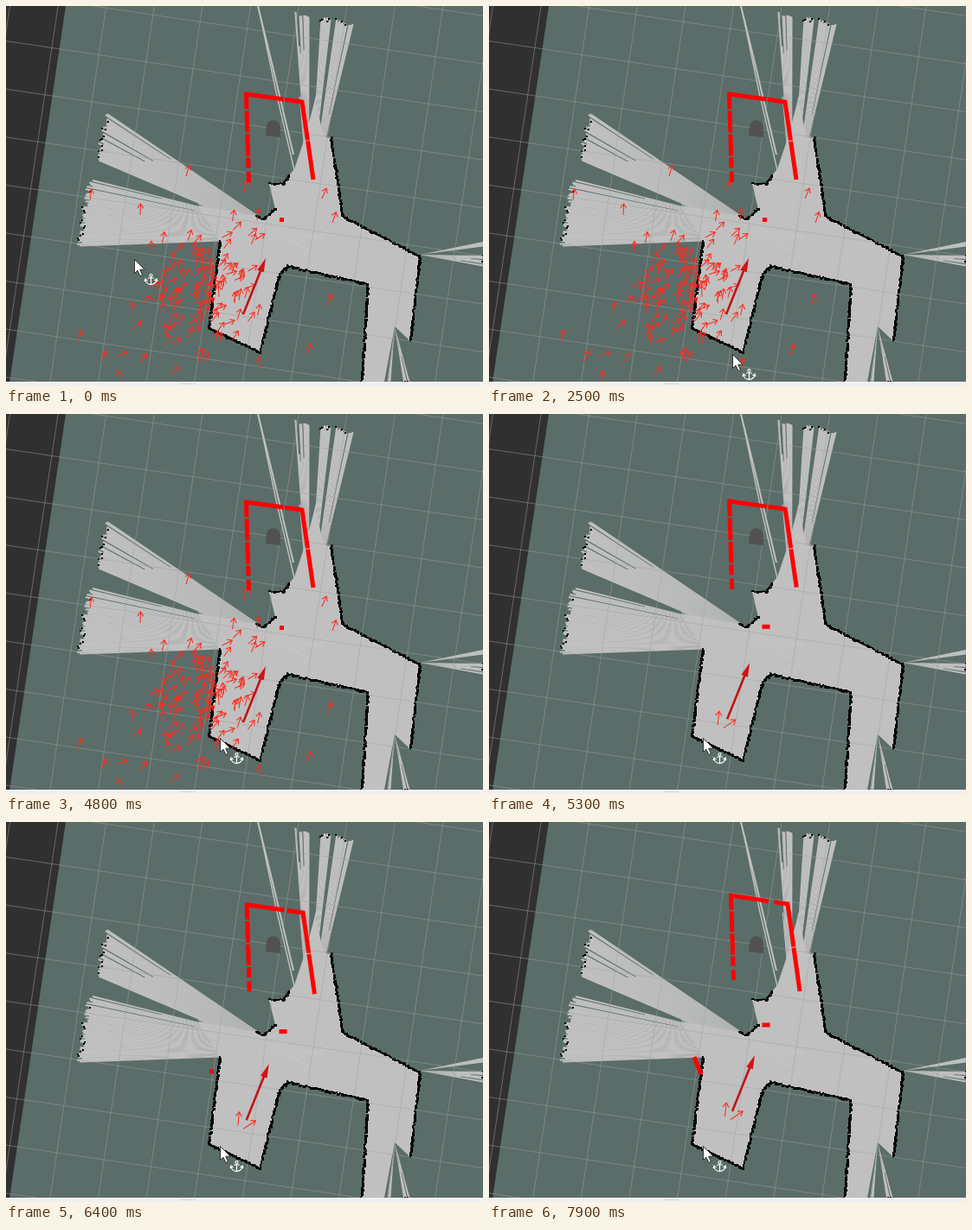
Recreate the animation shown at these times as an HTML page with a canvas. Size 551x440 px, loop 8 s.

```html
<!DOCTYPE html>
<html lang="en">
<head>
<meta charset="utf-8">
<title>Robot localization</title>
<style>
html, body { margin: 0; width: 100%; height: 100%; overflow: hidden; background: #5a6d69; }
canvas { display: block; }
</style>
</head>
<body>
<canvas id="stage" width="551" height="440"></canvas>
<script>
const W = 551, H = 440, LOOP = 8000;
const FLOOR = '#c0c0c0', UNKNOWN = '#5a6d69', RED = '#ff0000', THIN_RED = '#ff2a1e';
const ctx = document.getElementById('stage').getContext('2d');

function seeded(seed) {
  return () => {
    seed = (seed + 0x6D2B79F5) | 0;
    let v = Math.imul(seed ^ (seed >>> 15), 1 | seed);
    v = (v + Math.imul(v ^ (v >>> 7), 61 | v)) ^ v;
    return ((v ^ (v >>> 14)) >>> 0) / 4294967296;
  };
}

const mix = (a, b, k) => a + (b - a) * k;
const mixPoint = (p, q, k) => [mix(p[0], q[0], k), mix(p[1], q[1], k)];
const clamp01 = k => Math.max(0, Math.min(1, k));

function trace(g, points) {
  g.beginPath();
  points.forEach(([x, y]) => g.lineTo(x, y));
}

function fillShape(g, points, color) {
  trace(g, points);
  g.closePath();
  g.fillStyle = color;
  g.fill();
}

function strokeShape(g, points, color, width) {
  trace(g, points);
  g.strokeStyle = color;
  g.lineWidth = width;
  g.stroke();
}

// ---- static map ----

const ROOM = [
  [222, 231], [290, 243], [297, 247], [311, 235], [304, 206], [320, 206], [327, 196],
  [333, 189], [346, 150], [357, 108], [367, 152], [375, 153], [389, 244], [478, 290],
  [467, 388], [449, 371], [437, 435], [411, 435], [418, 322], [325, 301], [316, 310],
  [293, 401], [234, 373], [247, 272]
];
const WALL_SPANS = [[1, 3], [4, 6], [11, 14], [17, 23]];

// Sensor beams: many slim strips from an eye to an outer edge; some stop short.
function drawBeam(g, rnd, eye, a, b, gap) {
  const count = Math.ceil(Math.hypot(b[0] - a[0], b[1] - a[1]) / 1.8);
  for (let i = 0; i < count; i++) {
    const reach = rnd() < gap ? mix(0.5, 0.85, rnd()) : mix(0.985, 1.01, rnd());
    const near = mixPoint(eye, mixPoint(a, b, i / count), reach);
    const far = mixPoint(eye, mixPoint(a, b, (i + 1.3) / count), reach);
    fillShape(g, [eye, near, far], FLOOR);
    if (reach > 0.9 && rnd() < 0.3) {
      g.fillStyle = '#000';
      g.fillRect(Math.round(near[0]) - 1, Math.round(near[1]) - 1, 2, 2);
    }
  }
}

function drawWall(g, rnd, points) {
  g.fillStyle = '#000';
  for (let i = 1; i < points.length; i++) {
    const a = points[i - 1], b = points[i];
    const steps = Math.ceil(Math.hypot(b[0] - a[0], b[1] - a[1]) / 1.5);
    for (let n = 0; n <= steps; n++) {
      const [x, y] = mixPoint(a, b, n / steps);
      const size = rnd() < 0.5 ? 2 : 3;
      g.fillRect(Math.round(x + rnd() * 1.4 - 1.7), Math.round(y + rnd() * 1.4 - 1.7), size, size);
    }
  }
}

function drawGrid(g) {
  const dx = 54.4, dy = 8.1, x0 = 61, y0 = -6;
  for (let i = -3; i < 13; i++) {
    const x = x0 + dx * i, y = y0 + dy * i;
    const u = x0 - dy * i, v = y0 + dx * i;
    strokeShape(g, [[x + dy * 3, y - dx * 3], [x - dy * 10, y + dx * 10]], 'rgba(160,160,160,.5)', 1);
    strokeShape(g, [[u - dx * 2, v - dy * 2], [u + dx * 11, v + dy * 11]], 'rgba(160,160,160,.5)', 1);
  }
}

function buildMap() {
  const layer = document.createElement('canvas');
  layer.width = W;
  layer.height = H;
  const g = layer.getContext('2d'), rnd = seeded(11);
  const beam = (...args) => drawBeam(g, rnd, ...args);

  g.fillStyle = UNKNOWN;
  g.fillRect(0, 0, W, H);
  fillShape(g, [[0, 0], [69, 0], [4, 436], [0, 436]], '#303030');
  fillShape(g, ROOM, FLOOR);

  const west = [352, 284], southwest = [366, 268], north = [350, 234];
  const east = [478, 288], south = [449, 371];
  beam(west, [117, 124], [105, 180], 0.2);
  beam(southwest, [100, 201], [93, 216], 0.45);
  beam(southwest, [93, 216], [84, 278], 0.05);
  beam(north, [330, 5], [350, 12], 0.25);
  beam(north, [362, 13], [375, 16], 0.4);
  beam(north, [381, 17], [401, 21], 0.25);
  beam(east, [551, 273], [551, 278], 0);
  beam(east, [551, 289], [551, 301], 0.2);
  beam(south, [441, 435], [444, 435], 0);
  beam(south, [459, 435], [466, 435], 0.2);
  strokeShape(g, [[291, 0], [308, 70], [332, 172]], FLOOR, 2);
  strokeShape(g, [[293, 8], [312, 100], [333, 190]], FLOOR, 1.4);
  WALL_SPANS.forEach(([from, to]) => drawWall(g, rnd, ROOM.slice(from, to + 1)));
  drawGrid(g);

  // Robot base
  g.fillStyle = '#515151';
  g.beginPath();
  g.moveTo(300, 150);
  g.lineTo(301, 139);
  g.bezierCurveTo(304, 129, 315, 131, 317, 140);
  g.lineTo(317, 152);
  g.fill();

  g.fillStyle = '#f0f0f0';
  g.fillRect(0, 435, W, 5);
  g.fillStyle = '#a5a5a5';
  for (let x = 202; x < 218; x += 3) g.fillRect(x, 437, 1, 1);
  return layer;
}

// ---- pose particles ----

const CENTER = [228, 328];
const STRAYS = [
  [97, 225], [155, 242], [208, 197], [275, 215], [365, 223], [377, 251],
  [372, 346], [348, 404], [84, 388], [132, 435], [190, 427], [294, 420]
];

function buildParticles() {
  const rnd = seeded(29);
  const bell = () => rnd() + rnd() + rnd() - 1.5;
  const heading = () => mix(-100, -15, rnd());
  const list = STRAYS.map(([x, y]) => [x, y, heading()]);
  for (let i = 0; i < 115; i++) {
    const rise = bell();
    list.push([CENTER[0] + bell() * 68 - rise * 24, CENTER[1] + rise * 76, heading()]);
  }
  return list;
}

function drawParticle(x, y, deg, length = 13) {
  ctx.save();
  ctx.translate(x, y);
  ctx.rotate(deg * Math.PI / 180);
  strokeShape(ctx, [[0, 0], [length, 0]], THIN_RED, 1);
  strokeShape(ctx, [[length - 5, -3.5], [length, 0], [length - 5, 3.5]], THIN_RED, 1.1);
  ctx.restore();
}

// ---- motion ----

// Share of the robot's advance, starting at 4.8 s
const advance = t => clamp01((t - 4800) / 3000);

const CURSOR = [
  [0, 148, 293], [100, 148, 293], [900, 305, 415], [1200, 307, 427], [1900, 307, 427],
  [2500, 281, 403], [3300, 271, 391], [3800, 254, 379], [4400, 247, 375]
];

function cursorAt(t) {
  const next = CURSOR.findIndex(key => key[0] > t);
  if (next < 0) return CURSOR[CURSOR.length - 1].slice(1);
  const a = CURSOR[next - 1], b = CURSOR[next];
  return mixPoint(a.slice(1), b.slice(1), (t - a[0]) / (b[0] - a[0]));
}

// Cuts are start and end shares of each visible piece
function drawDashes(a, b, cuts) {
  for (let i = 0; i < cuts.length; i += 2) {
    strokeShape(ctx, [mixPoint(a, b, cuts[i]), mixPoint(a, b, cuts[i + 1])], RED, 5);
  }
}

function dot(x, y, w = 5, h = 5) {
  ctx.fillStyle = RED;
  ctx.fillRect(x - w / 2, y - h / 2, w, h);
}

function drawScan(step, t) {
  const d = advance(t) ** 1.6;
  const j = (seeded(step >> 1)() - 0.5) * 0.02;
  const tl = [277.5 + 2 * d, 102 - 17 * d], tr = [342 + 3 * d, 111 - 16 * d];
  const br = [355 + 4 * d, 201 - 5 * d], bl = [280.5 + 2 * d, 204 - 21 * d];
  drawDashes(tl, tr, [-0.03, 0.67 + j, 0.69 + j + d * 0.08, 1.02]);
  drawDashes(tr, br, [-0.02, 0.5 + j, 0.51 + j, 1]);
  drawDashes(tl, bl, [-0.02, 0.17, 0.19, 0.44 + j, 0.46 + j, 0.7, 0.72, 0.84 + j, 0.88, 1]);

  if (step < 50) dot(318.5, 247.5);
  else if (step < 70 || step > 74) dot(320, 247 - 12 * d, 9);

  if (step > 74) strokeShape(ctx, [[237, 272], [245, 292]], RED, 5);
  else if (step >= 62) dot(237.5, 289);

  // Brief echoes inside the room
  if (step > 9 && step < 30 && (step % 5 === 1 || step % 5 === 2)) {
    for (let i = 0; i < 3; i++) dot(284.5 + 4 * i, 327 + 4.7 * i);
  }
}

function drawPose(t) {
  const u = advance(t);
  ctx.save();
  ctx.translate(274 + 7 * u, 357 - 22 * u);
  ctx.rotate(Math.atan2(-65, 26));
  strokeShape(ctx, [[0, 0], [57, 0]], '#c01414', 2.6);
  fillShape(ctx, [[54, -4], [70, 0], [54, 4]], '#d31212');
  ctx.restore();
}

function drawParticles(step, t) {
  if (step < 53) {
    const radius = step < 50 ? Infinity : 90 - 20 * (step - 50);
    particles
      .filter(([x, y]) => Math.hypot(x - 285, y - 330) < radius)
      .forEach(p => drawParticle(...p));
    return;
  }
  const u = advance(t), x = 262.5 + 10 * u, y = 364 - 23 * u;
  drawParticle(x, y, -84, 16);
  drawParticle(x + 6.5, y + 3.5, -34, 17);
}

function drawCursor(t) {
  const [x, y] = cursorAt(t).map(Math.round);
  ctx.save();
  ctx.translate(x + 0.5, y + 0.5);
  const arrow = [[0, 0], [0, 16], [3.5, 12.7], [6.5, 19], [9, 18], [6.2, 11.8], [11.5, 11.5]];
  fillShape(ctx, arrow, '#fff');
  strokeShape(ctx, [...arrow, arrow[0]], '#222', 0.9);

  // Move handle
  ctx.translate(19, 22.5);
  ctx.strokeStyle = '#fff';
  ctx.lineWidth = 1.2;
  ctx.beginPath();
  ctx.arc(0, -4, 1.5, 0, Math.PI * 2);
  ctx.moveTo(0, -2.5);
  ctx.lineTo(0, 7);
  ctx.moveTo(6.5, 1);
  ctx.arc(0, 0, 6.5, 0.15, Math.PI - 0.15);
  for (const side of [-1, 1]) {
    ctx.moveTo(side * 7.5, 3);
    ctx.lineTo(side * 6.5, 0);
    ctx.lineTo(side * 4, 2);
    ctx.moveTo(0, -1);
    ctx.lineTo(side * 3.5, -1);
  }
  ctx.stroke();
  ctx.restore();
}

const map = buildMap();
const particles = buildParticles();
const start = performance.now();

function render(now) {
  const clock = Math.max(0, now - start) % LOOP;
  const step = Math.floor(clock / 100), t = step * 100;
  ctx.drawImage(map, 0, 0);
  ctx.save();
  ctx.beginPath();
  ctx.rect(0, 0, W, 435);
  ctx.clip();
  drawParticles(step, t);
  drawPose(t);
  drawScan(step, t);
  ctx.restore();
  drawCursor(t);
  requestAnimationFrame(render);
}
render(start);
</script>
</body>
</html>
```
